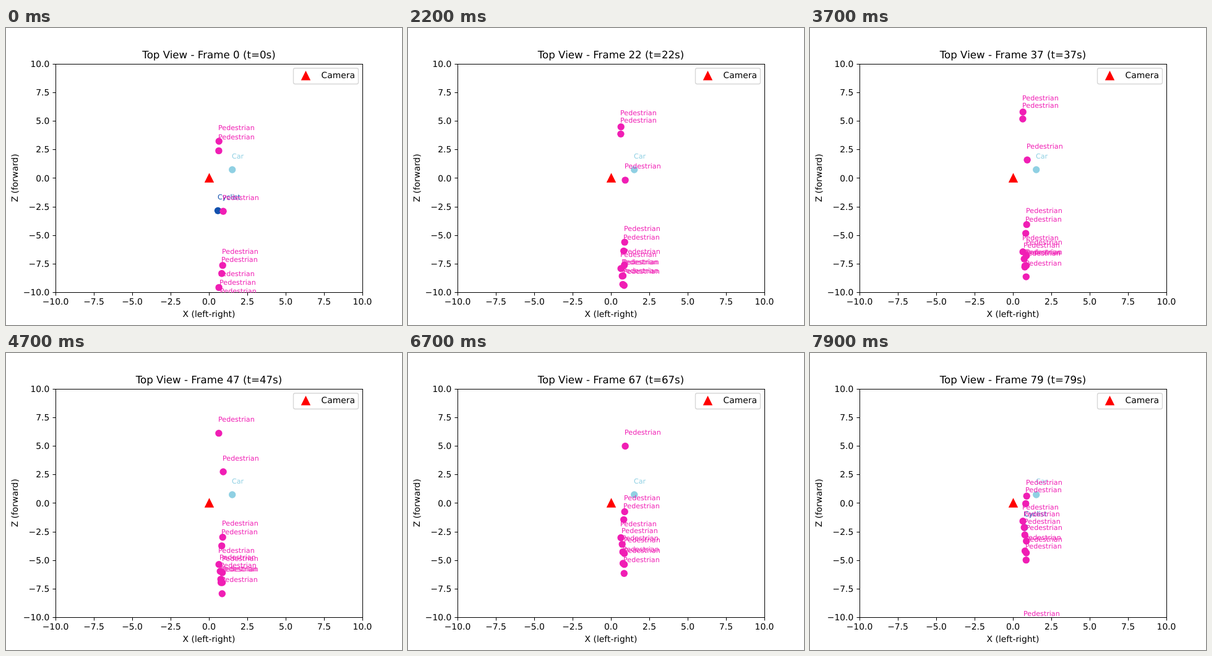
These frames come from a looping animation (640 px wide and 480 px high, 8 s). An HTML page with a canvas:

```html
<!DOCTYPE html>
<html lang="en">
<head>
<meta charset="utf-8">
<title>Top View</title>
<style>
html, body { margin: 0; width: 640px; height: 480px; overflow: hidden; background: #fff; }
canvas { display: block; }
</style>
</head>
<body>
<canvas id="stage" width="640" height="480"></canvas>
<script>
const ctx = document.getElementById('stage').getContext('2d');
const FRAME_MS = 100, FRAMES = 80;
const PINK = '#f01eb4', BLUE = '#1251ae', SKY = '#8fd0e3';
const UNIT_X = 24.8, UNIT_Y = 18.48, CX = 328, CY = 242.4;
const LEFT = 80.5, RIGHT = 576.5, TOP = 58.5, BOTTOM = 427.5;

// A mover goes from one height to another during its life; lag is how far
// it trails a steady pace around the middle.
const mover = (name, color, x, first, last, from, to, lag = 0) =>
  ({ name, color, x, first, last, from, to, lag });
const walker = (...path) => mover('Pedestrian', PINK, ...path);

const movers = [
  mover('Car', SKY, 365.7, 0, 79, 229, 229),
  mover('Cyclist', BLUE, 342.5, 0, 14, 295.2, 306.4),
  mover('Cyclist', BLUE, 346.6, 76, 79, 282, 282),
  walker(344.2, 0, 41, 183, 129, 6),
  walker(343.9, 0, 50, 198.4, 124.4, 5.5),
  walker(351.1, 0, 75, 296.2, 134, -3),
  walker(350.2, 0, 79, 383.6, 231.2, 5.5),
  walker(348.7, 0, 79, 396.7, 243.4, 7),
  walker(344.1, 0, 79, 419.4, 271.8, 11.5),
  walker(346.2, 0, 79, 433, 282, 11),
  walker(347.2, 0, 79, 447, 294, 11),
  walker(349.7, 16, 79, 387, 304, 9),
  walker(347.5, 16, 79, 405, 320, 8),
  walker(349.3, 17, 79, 418, 334.6, 11.5),
  walker(349.6, 30, 79, 392, 323, 3),
  walker(346.2, 67, 79, 461, 443)
];

function heightAt({ first, last, from, to, lag }, n) {
  const u = (n - first) / (last - first);
  return from + (to - from) * u + lag * Math.sin(Math.PI * u ** 0.8);
}

function text(str, x, y, size, align = 'left', color = '#000') {
  ctx.font = `${size}px "DejaVu Sans", sans-serif`;
  ctx.textAlign = align;
  ctx.fillStyle = color;
  ctx.fillText(str, x, y);
}

function line(x1, y1, x2, y2) {
  ctx.beginPath();
  ctx.moveTo(x1, y1);
  ctx.lineTo(x2, y2);
  ctx.stroke();
}

function triangle(x, y) {
  const r = 6.6;
  ctx.fillStyle = ctx.strokeStyle = '#f00';
  ctx.lineWidth = 1.39;
  ctx.beginPath();
  ctx.moveTo(x, y - r);
  ctx.lineTo(x + r, y + r);
  ctx.lineTo(x - r, y + r);
  ctx.closePath();
  ctx.fill();
  ctx.stroke();
}

function clipped(paint) {
  ctx.save();
  ctx.beginPath();
  ctx.rect(80, 58, 497, 370);
  ctx.clip();
  paint();
  ctx.restore();
}

function drawAxes() {
  ctx.strokeStyle = '#000';
  ctx.lineWidth = 1;
  for (let v = -10; v <= 10; v += 2.5) {
    const label = v.toFixed(1).replace('-', '\u2212');
    const x = CX + v * UNIT_X, y = CY - v * UNIT_Y;
    const px = Math.round(x) + 0.5, py = Math.round(y) + 0.5;
    line(px, BOTTOM, px, BOTTOM + 5);
    line(LEFT - 5, py, LEFT, py);
    text(label, x, 447, 13.89, 'center');
    text(label, 70.3, Math.round(y + 5.2), 13.89, 'right');
  }
  ctx.strokeRect(LEFT, TOP, RIGHT - LEFT, BOTTOM - TOP);
  text('X (left-right)', CX, 467, 13.89, 'center');
  ctx.save();
  ctx.translate(19, CY);
  ctx.rotate(-Math.PI / 2);
  text('Z (forward)', 0, 0, 13.89, 'center');
  ctx.restore();
}

function drawLegend() {
  ctx.beginPath();
  ctx.roundRect(464.5, 65, 105, 25.5, 2.8);
  ctx.fillStyle = 'rgba(255,255,255,0.8)';
  ctx.fill();
  ctx.strokeStyle = 'rgba(204,204,204,0.8)';
  ctx.lineWidth = 1.39;
  ctx.stroke();
  triangle(484.5, 77.2);
  text('Camera', 509.5, 81, 13.89);
}

function draw(n) {
  ctx.fillStyle = '#fff';
  ctx.fillRect(0, 0, 640, 480);
  const seen = movers
    .filter(m => n >= m.first && n <= m.last)
    .map(m => ({ ...m, y: heightAt(m, n) }));

  clipped(() => {
    for (const { x, y, color } of seen) {
      ctx.fillStyle = color;
      ctx.beginPath();
      ctx.arc(x, y, 5.7, 0, Math.PI * 2);
      ctx.fill();
    }
  });
  triangle(CX + 0.5, CY);
  drawAxes();
  clipped(() => {
    for (const { name, x, y, color } of seen) {
      text(name, Math.round(x) - 1, Math.round(y - UNIT_Y), 11.11, 'left', color);
    }
  });
  text(`Top View - Frame ${n} (t=${n}s)`, CX, 49, 16.67, 'center');
  drawLegend();
}

function tick(now) {
  draw(Math.floor(now / FRAME_MS) % FRAMES);
  requestAnimationFrame(tick);
}

ctx.textRendering = 'geometricPrecision';
draw(0);
requestAnimationFrame(tick);
</script>
</body>
</html>
```
